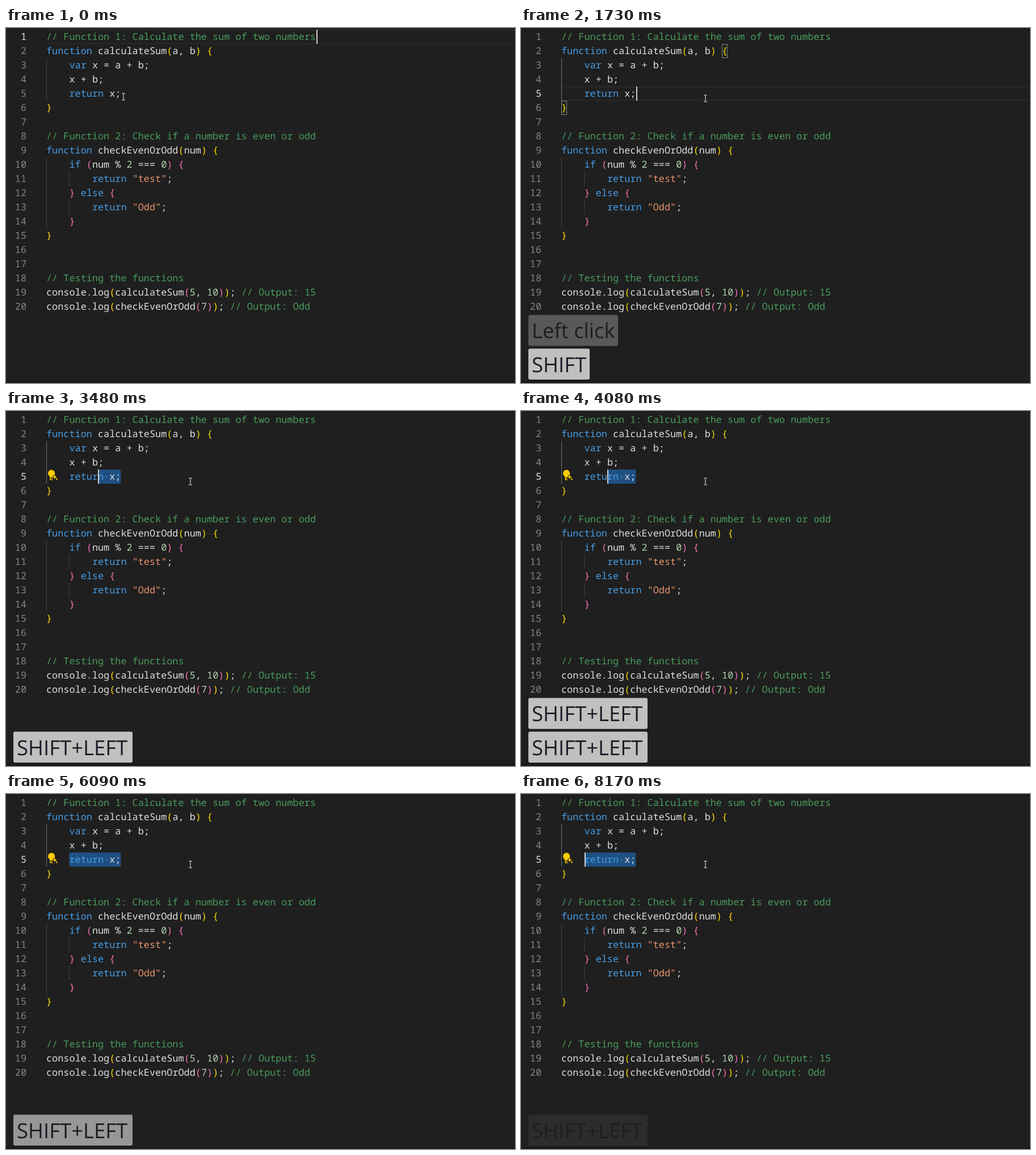
An HTML page for the animation above (8560 ms loop, 897x625 px).

```html
<!DOCTYPE html>
<html lang="en">
<head>
<meta charset="utf-8">
<title>Selecting code with the keyboard</title>
<style>
  html, body { margin: 0; width: 100%; height: 100%; overflow: hidden; background: #1f1f1f; }
  svg { display: block; width: 897px; height: 625px; }
  text { white-space: pre; text-rendering: geometricPrecision; }
  .code { font: 16.85px "Noto Sans Mono", "DejaVu Sans Mono", monospace; }
  .num { fill: #858585; text-anchor: end; }
  .num.active { fill: #e0e0d4; }
  .plain { fill: #dedede; }
  .comment { fill: #489c5c; }
  .keyword { fill: #459de6; }
  .string { fill: #e8936c; }
  .number { fill: #b0d3b0; }
  .gold { fill: #ffdc00; }
  .pink { fill: #f870b6; }
  .guide { fill: #404040; }
  .guide.active { fill: #757575; }
  .key rect { fill: #c0c0be; }
  .key text { font: 36.5px "Open Sans", "Noto Sans", sans-serif; fill: #1c1a27; }
</style>
</head>
<body>
<svg id="stage" viewBox="0 0 897 625"></svg>
<script>
const LOOP = 8560, LEFT = 71, CHAR = 10.11, TOP = 3, LINE = 25;
const SOURCE = `// Function 1: Calculate the sum of two numbers
function calculateSum(a, b) {
    var x = a + b;
    x + b;
    return x;
}

// Function 2: Check if a number is even or odd
function checkEvenOrOdd(num) {
    if (num % 2 === 0) {
        return "test";
    } else {
        return "Odd";
    }
}


// Testing the functions
console.log(calculateSum(5, 10)); // Output: 15
console.log(checkEvenOrOdd(7)); // Output: Odd`.split('\n');

const stage = document.getElementById('stage');
const colX = col => LEFT + col * CHAR;
const lineY = line => TOP + (line - 1) * LINE;

function add(tag, attrs, parent = stage, text = '') {
  const el = document.createElementNS('http://www.w3.org/2000/svg', tag);
  for (const name in attrs) el.setAttribute(name, attrs[name]);
  el.textContent = text;
  parent.append(el);
  return el;
}
const box = (x, y, width, height, extra, parent) =>
  add('rect', { x, y, width, height, ...extra }, parent);
const show = (el, on) => { el.style.display = on ? '' : 'none'; };

// Layers below the text
box(0, 0, 897, 625, { fill: '#1f1f1f' });
box(0, 621, 897, 4, { fill: '#1a1a1a' });
const lineMark = add('g');
for (const y of [0, LINE - 1.5]) box(LEFT, y, 826, 1.5, { fill: '#2b2b2b' }, lineMark);

const selection = box(0, lineY(5), 0, LINE, { rx: 3, fill: '#1f5082' });
const matches = add('g');
for (const [line, col] of [[3, 17], [4, 9], [11, 21], [13, 20], [19, 32], [20, 30]])
  box(colX(col), lineY(line), CHAR, LINE, { fill: '#343a41' }, matches);

const brackets = add('g');
for (const [line, col] of [[2, 28], [6, 0]])
  box(Math.round(colX(col)) + .5, lineY(line) + .5, 9, LINE - 1,
    { fill: '#1c261c', stroke: '#858585' }, brackets);

const guide = (col, from, to) =>
  box(Math.round(colX(col)), lineY(from), 1, (to - from + 1) * LINE, { class: 'guide' });
const blockGuide = guide(0, 3, 5);
guide(0, 10, 14);
guide(4, 11, 11);
guide(4, 13, 13);

// Code with syntax colours; brackets alternate by nesting depth
const TOKEN = /(?<comment>\/\/.*)|(?<string>"[^"]*")|(?<keyword>\b(?:function|var|return|if|else)\b)|(?<number>\b\d+)|(?<open>[({])|(?<close>[)}])|(?<plain>[a-zA-Z.]+|[^\s\w(){}"]+)/g;
let depth = 0;
const numbers = SOURCE.map((code, i) => {
  const y = lineY(i + 1) + 18.3;
  for (const token of code.matchAll(TOKEN)) {
    let kind = Object.keys(token.groups).find(name => token.groups[name]);
    if (kind === 'open') kind = depth++ % 2 ? 'pink' : 'gold';
    if (kind === 'close') kind = --depth % 2 ? 'pink' : 'gold';
    add('text', { x: colX(token.index), y, class: 'code ' + kind }, stage, token[0]);
  }
  return add('text', { x: 36, y, class: 'code num' }, stage, i + 1);
});

const spaceDot = add('circle', { cx: colX(10.5), cy: 116, r: 1, fill: '#7d97ad' });
const caret = box(0, 0, 2, LINE, { fill: '#d0d0cc' });

const bulb = add('g', { fill: '#ffcc00' });
add('path', { d: 'M73 103h14v9l5 3v8h-16z', fill: '#1f1f1f' }, bulb);
add('path', { d: 'M80 103.5a6.3 6.3 0 0 1 5.6 9l-3.1 2.3-1 2.2h-4.3l-.8-2.4a6.3 6.3 0 0 1 3.6-11.1z' }, bulb);
add('path', { d: 'M77.2 118h4.4v1.2h-2.6v1.2h3.4v1.3h-3.6q-1.6-.6-1.6-2z' }, bulb);
add('path', { d: 'M85.8 112.3l1.2 2.7 2.7 1.2-2.7 1.2-1.2 2.7-1.2-2.7-2.7-1.2 2.7-1.2z' }, bulb);
add('path', { d: 'M89.4 117.8l.7 1.6 1.6.7-1.6.7-.7 1.6-.7-1.6-1.6-.7 1.6-.7z' }, bulb);

const mouse = add('path', {
  d: 'M-3-6h1.5L0-5 1.5-6H3M0-5V5M-3 6h1.5L0 5 1.5 6H3',
  fill: 'none', stroke: '#dcdcdc', 'stroke-width': 1.1
});

function keyLabel(y) {
  const group = add('g', { class: 'key' });
  return {
    group,
    back: box(13, y, 0, 54.5, { rx: 3 }, group),
    label: add('text', { x: 19, y: y + 41 }, group)
  };
}
const upper = keyLabel(505.2), lower = keyLabel(564.5);

// Step tables: [time, value...]
const CLICK = 470;
const SHIFT_LEFT = 'SHIFT+LEFT';
const WIDTHS = { 'Left click': 158, SHIFT: 108, [SHIFT_LEFT]: 210 };
const PRESSES = [2020, 2410, 3150, 3480, 3950, 4210, 4600, 4810, 5170];
const MOUSE = [[0, 207, 121], [70, 206.5, 118], [140, 206.5, 116], [410, 209, 116],
  [470, 216, 117], [540, 232, 118], [600, 254, 120], [670, 279, 121],
  [740, 301, 123], [800, 316, 124], [940, 325, 124]];
const LOWER = [[0, '', 0], [600, 'Left click', 1], [1270, 'Left click', .85], [1530, 'SHIFT', 1],
  [2140, SHIFT_LEFT, 1], [5630, SHIFT_LEFT, .96], [5760, SHIFT_LEFT, .9], [6090, SHIFT_LEFT, .75],
  [6160, SHIFT_LEFT, .7], [6440, SHIFT_LEFT, .55], [6910, SHIFT_LEFT, .35], [7170, SHIFT_LEFT, .24],
  [7510, SHIFT_LEFT, .12], [7640, SHIFT_LEFT, .08]];
const UPPER = [[0, '', 0], [1530, 'Left click', .55], [1730, 'Left click', .36],
  [1880, 'Left click', .2], [2020, 'Left click', .08], [2140, '', 0],
  [2410, SHIFT_LEFT, 1], [2880, SHIFT_LEFT, .8], [3010, SHIFT_LEFT, .6], [3150, SHIFT_LEFT, .4],
  [3280, SHIFT_LEFT, .2], [3480, '', 0], [3610, SHIFT_LEFT, 1], [3750, SHIFT_LEFT, .8],
  [3950, SHIFT_LEFT, .6], [4080, SHIFT_LEFT, 1], [4410, SHIFT_LEFT, .8], [4600, SHIFT_LEFT, 1],
  [5000, SHIFT_LEFT, .85], [5170, SHIFT_LEFT, .7], [5300, SHIFT_LEFT, 1],
  [5430, SHIFT_LEFT, .7], [5630, SHIFT_LEFT, .3], [5760, '', 0]];
const CARET_TOGGLES = [1070, 1530, 2880, 3150, 5630, 6160, 6640, 7170, 7640, 8170];

const stepAt = (table, t) => table.findLast(row => row[0] <= t);

function setKey(key, [, text, opacity]) {
  key.group.setAttribute('opacity', opacity);
  key.back.setAttribute('width', WIDTHS[text] || 0);
  if (key.label.textContent !== text) key.label.textContent = text;
}

function draw(t) {
  const clicked = t >= CLICK;
  const selected = PRESSES.filter(p => p <= t).length;
  const line = clicked ? 5 : 1;
  const col = clicked ? 13 - selected : 47;

  lineMark.setAttribute('transform', `translate(0 ${lineY(line)})`);
  show(lineMark, !selected);
  show(brackets, clicked && !selected);
  show(matches, selected === 1);
  show(bulb, t >= 2340);
  show(spaceDot, selected >= 3);
  blockGuide.classList.toggle('active', clicked);
  numbers.forEach((n, i) => n.classList.toggle('active', i + 1 === line));

  selection.setAttribute('x', colX(col));
  selection.setAttribute('width', selected * CHAR);
  caret.setAttribute('x', Math.round(colX(col) + .4));
  caret.setAttribute('y', lineY(line));
  show(caret, CARET_TOGGLES.filter(c => c <= t).length % 2 === 0);

  const [, x, y] = stepAt(MOUSE, t);
  mouse.setAttribute('transform', `translate(${x} ${y})`);
  setKey(lower, stepAt(LOWER, t));
  setKey(upper, stepAt(UPPER, t));
}

const start = performance.now();
function tick() {
  draw((performance.now() - start) % LOOP);
  requestAnimationFrame(tick);
}
tick();
</script>
</body>
</html>
```
